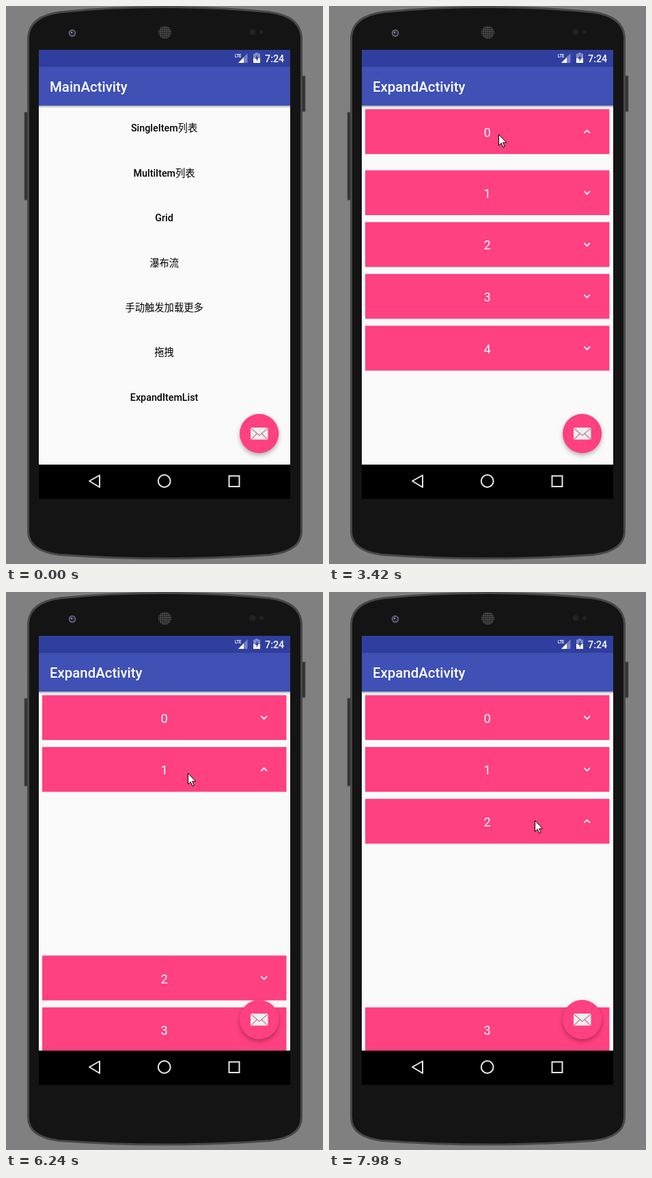
These frames come from a looping animation (464x814 px, 8000 ms). An HTML page:

```html
<!DOCTYPE html>
<html lang="zh-CN">
<head>
<meta charset="utf-8">
<style>
html, body { margin: 0; width: 100%; height: 100%; overflow: hidden; background: #808080; }
svg { display: block; width: 100%; height: 100%; font-family: Roboto, "Noto Sans CJK SC", "Noto Sans CJK", sans-serif; }
.mid { text-anchor: middle; }
.title { font-size: 20.4px; font-weight: 500; fill: #fff; }
.menu { font-size: 14.3px; font-weight: 500; fill: #000; }
.num { font-size: 18.4px; fill: #fff; }
.line { fill: none; stroke: #fff; stroke-width: 1.8; }
.fab { filter: drop-shadow(0 3px 3px rgba(0,0,0,.3)); }
</style>
</head>
<body>
<svg viewBox="0 0 464 814">
  <defs>
    <clipPath id="screen"><path d="M48 64h368v655H48z"/></clipPath>
    <clipPath id="content"><path d="M48 145h368v524H48z"/></clipPath>
    <linearGradient id="shade" x2="0" y2="1">
      <stop stop-opacity=".32"/><stop offset="1" stop-opacity="0"/>
    </linearGradient>
    <pattern id="mesh" width="3" height="3" patternUnits="userSpaceOnUse">
      <circle cx="1.5" cy="1.5" r="1" fill="#6c6c6c"/>
    </pattern>
  </defs>

  <!-- phone -->
  <path d="M27 155h5v128h-5zM433 102h5v52h-5z" fill="#333" stroke="#555" stroke-width=".8"/>
  <path d="M32.5 46Q34 15 79 9Q150 1.5 232.5 1.5Q315 1.5 386 9Q431 15 432.5 46V767Q432 795 387 800.500Q310 806 232.500 806Q155 806 78 800.500Q33 795 32.500 767Z" fill="#141414" stroke="#484848" stroke-width="3"/>
  <circle cx="97" cy="39.500" r="5.200" fill="#77777c"/>
  <circle cx="97" cy="39.500" r="3.800" fill="#23233f"/>
  <circle cx="96" cy="38.500" r="1.300" fill="#8d8dc8"/>
  <circle cx="232.500" cy="38.500" r="9.500" fill="#1d1d1d"/>
  <circle cx="232.500" cy="38.500" r="9.500" fill="url(#mesh)"/>
  <g fill="#222"><circle cx="361" cy="38" r="4.500"/><circle cx="374" cy="38" r="3"/></g>

  <g clip-path="url(#screen)"><g id="main"></g><g id="expand"></g></g>

  <!-- system bars -->
  <g fill="#fff">
    <text x="335" y="75" font-size="8" font-weight="700" textLength="10" lengthAdjust="spacingAndGlyphs" id="lte">LTE</text>
    <path d="M353.500 69V83H340z" opacity=".35"/>
    <path d="M348 75V83H340z"/>
    <path d="M365 68h4v1.500h3V83h-10V69.500h3z" opacity=".4"/>
    <path d="M362 76h10v7h-10z"/>
    <path d="M368 71l-3.500 6h2.200v4l3.300-6h-2z" fill="#303f9f"/>
    <text x="379" y="82" font-size="14.300" font-weight="500">7:24</text>
  </g>
  <g class="line" style="stroke:#e8e8e8;stroke-width:2">
    <path d="M122 693L137 684.500V702z" stroke-linejoin="round"/>
    <circle cx="231.700" cy="693" r="8.900"/>
    <path d="M326.500 685.500h15v15.500h-15z"/>
  </g>
  <path id="cursor" d="M.5 .5V16.500L4.200 13L6.800 19L9.200 18L6.600 12.200H11.700Z" fill="#fff" stroke="#000" stroke-width="1"/>
</svg>
<script>
const $ = id => document.getElementById(id);
const label = (cls, y, text) => `<text class="mid ${cls}" x="231.600" y="${y}">${text}</text>`;
const rect = (x, y, w, h, fill) => `<rect x="${x}" y="${y}" width="${w}" height="${h}" fill="${fill}"/>`;

$('lte').removeAttribute('textLength');
$('lte').setAttribute('transform', 'translate(335 0) scale(.7 1) translate(-335 0)');

const fab = `<circle class="fab" cx="370.600" cy="623.700" r="28.600" fill="#ff4081"/>
  <rect x="358" y="615" width="25.500" height="17.500" rx="1.500" fill="#eee"/>
  <path d="M359 632l9-9M382.500 632l-9-9M358.500 616l12.300 10.500L383 616" fill="none" stroke="#c9808f" stroke-width="1.300"/>`;

// one activity window: bars, body, toolbar shadow, floating button
const page = (title, body) => rect(48, 64, 368, 655, '#000') +
  rect(48, 64, 368, 24.5, '#303f9f') + rect(48, 145, 368, 524, '#fafafa') +
  `<g clip-path="url(#content)">${body}</g>` +
  rect(48, 145, 368, 4, 'url(#shade)') + rect(48, 88, 368, 57.3, '#3f51b5') +
  rect(48, 87, 368, 1.5, '#2d3a92') +
  `<text class="title" x="64" y="125">${title}</text>` + fab;

const menu = ['SingleItem列表', 'MultiItem列表', 'Grid', '瀑布流', '手动触发加载更多', '拖拽', 'ExpandItemList'];
$('main').innerHTML = page('MainActivity', menu.map((s, i) => label('menu', 183.3 + 65.4 * i, s)).join(''));

const ROW = 75.6, CHILD = 67.5, TOP = 150.5;
const rows = [0, 1, 2, 3, 4].map(i => `<g id="row${i}">` + rect(53, 0, 357.5, 65.4, '#ff4081') +
  label('num', 40.2, i) + `<path class="line" id="arrow${i}" d="M373.500 -2.200L377.700 2L381.900 -2.200"/></g>`).join('');
const kids = [0, 1, 2, 3].map(i => rect(58, CHILD * i, 347.5, 65.4, '#aaa') +
  label('num', CHILD * i + 39.7, i)).join('');
$('expand').innerHTML = page('ExpandActivity',
  `<path id="spin" fill="none" stroke="#ff4081" stroke-width="6.300"/>
   <g id="list"><g id="kids">${kids}</g>${rows}</g>`);

const clamp = (t, a, d) => Math.min(1, Math.max(0, (t - a) / d));
const smooth = x => .5 - .5 * Math.cos(Math.PI * x);

// cubic bezier between the given points, solved for x
function bezier(x, [x0, x1, x2, x3]) {
  let lo = 0, hi = 1;
  for (let i = 0; i < 20; i++) {
    const s = (lo + hi) / 2, r = 1 - s;
    if (x0 * r ** 3 + 3 * x1 * s * r * r + 3 * x2 * s * s * r + x3 * s ** 3 < x) lo = s; else hi = s;
  }
  return lo * lo * (3 - 2 * lo);
}

function spinner(t) {
  const f = ((t - 1052 + 1333) % 1333) / 1333;
  const head = f > .5 ? 1 : bezier(f, [0, .2, .1, .5]);
  const tail = f < .5 ? 0 : bezier(f, [.5, .7, .6, 1]);
  const base = -27 + 90 * f + (t - 1052) * 720 / 6665;
  const a = base + 270 * tail - 6, b = base + 270 * head + 6;
  const at = d => `${232 + 30.7 * Math.cos(d * Math.PI / 180)} ${407 + 30.7 * Math.sin(d * Math.PI / 180)}`;
  $('spin').setAttribute('d', `M${at(a)}A30.700 30.700 0 ${b - a > 180 ? 1 : 0} 1 ${at(b)}`);
}

// row, open time, close time
const taps = [[0, 3330, 5100], [1, 6000, 6900], [2, 7740, 9e9]];

// time, x, y
const path = [[60, 402, 222], [300, 201, 569], [480, 201, 569], [540, 207, 567], [720, 207, 567],
  [1560, 255, 478], [2100, 250, 380], [2340, 262, 288], [2700, 248, 187], [3560, 248, 187],
  [4140, 262, 400], [4380, 236, 481], [4640, 274, 330], [4920, 249, 183], [5240, 249, 183],
  [5580, 258, 340], [5880, 266, 264], [7080, 266, 264], [7680, 301, 333], [8000, 301, 333]];

function pointer(t) {
  $('cursor').style.display = t < 60 ? 'none' : '';
  const k = Math.max(1, path.findIndex(p => p[0] > t));
  const [t0, x0, y0] = path[k - 1], [t1, x1, y1] = path[k];
  const u = clamp(t, t0, t1 - t0);
  $('cursor').setAttribute('transform', `translate(${x0 + (x1 - x0) * u} ${y0 + (y1 - y0) * u})`);
}

function list(t) {
  $('list').setAttribute('opacity', clamp(t, 3060, 120));
  const [open, on, off] = taps.findLast(p => t >= p[1]) || taps[0];
  const gap = 4 * CHILD * (smooth(clamp(t, on + 55, 250)) - smooth(clamp(t, off + 175, 250)));
  const seen = clamp(t, on + 305, 120) - clamp(t, off + 55, 120);
  for (let i = 0; i < 5; i++) {
    $('row' + i).setAttribute('transform', `translate(0 ${TOP + ROW * i + (i > open ? gap : 0)})`);
    const up = i === open && t >= on && t < off;
    $('arrow' + i).setAttribute('transform', `translate(0 32.700) ${up ? 'scale(1 -1)' : ''}`);
  }
  $('kids').setAttribute('opacity', seen);
  $('kids').setAttribute('transform', `translate(0 ${TOP + ROW * open + 72.9})`);
}

function draw(now) {
  const t = now % 8000;
  const slide = 52 * (1 - clamp(t, 1000, 350)) ** 5;
  $('expand').setAttribute('transform', `translate(0 ${slide})`);
  $('expand').setAttribute('opacity', clamp(t, 1000, 200));
  $('spin').style.display = t < 1052 || t >= 3060 ? 'none' : '';
  spinner(t);
  list(t);
  pointer(t);
  requestAnimationFrame(draw);
}
draw(0);
</script>
</body>
</html>
```
